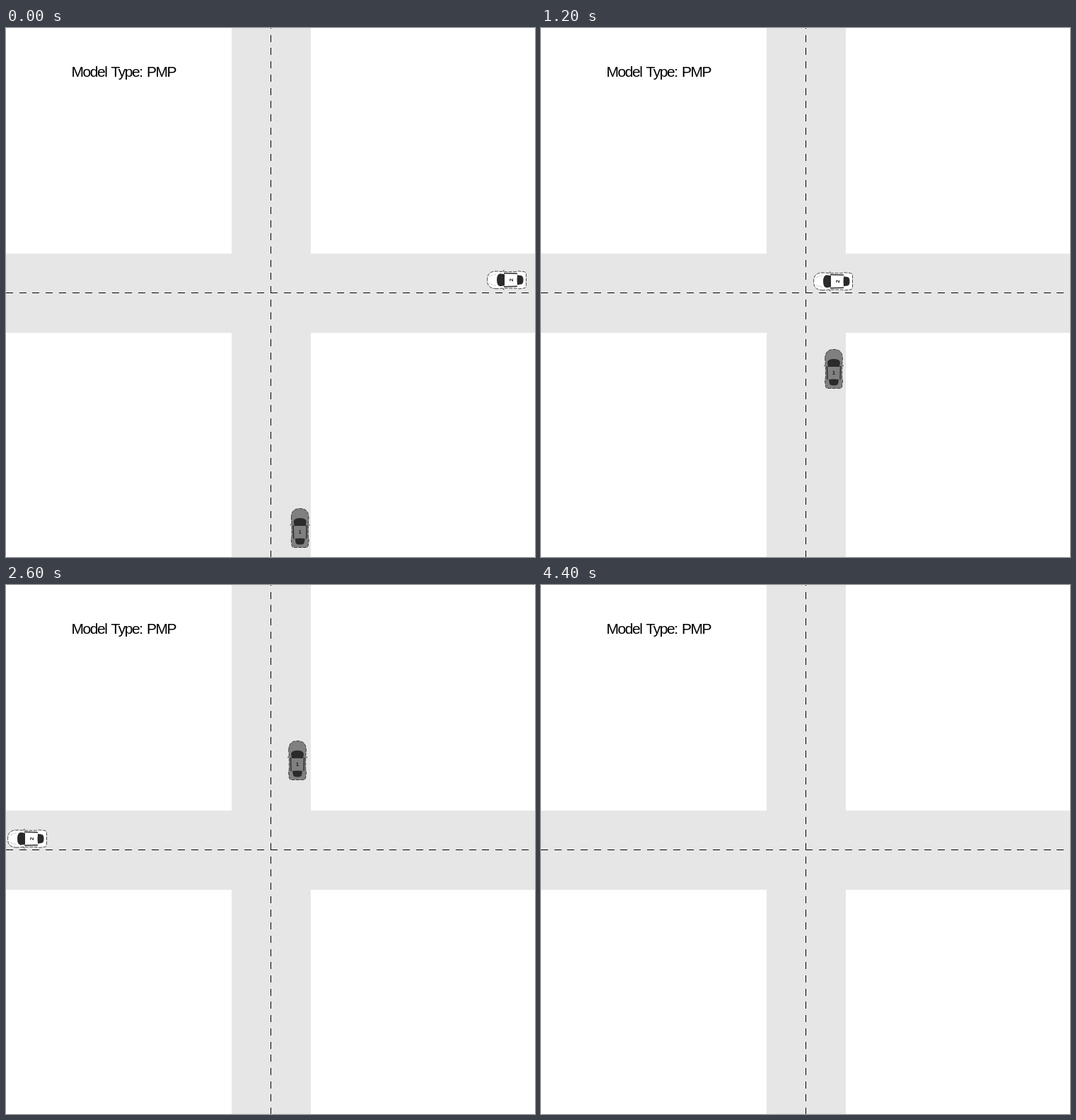
An HTML page that plays this animation: 748x748 px, repeating every 5800 ms.

```html
<!DOCTYPE html>
<html lang="en">
<head>
<meta charset="utf-8">
<title>Crossing</title>
<style>
html, body { margin: 0; width: 100%; height: 100%; overflow: hidden; background: #fff; }
svg { display: block; }
text { font-family: "Liberation Sans", Arial, sans-serif; }
.label { font-size: 21px; letter-spacing: -1.45px; word-spacing: 2px; }
.number { font-size: 8px; font-weight: bold; text-anchor: middle; fill: #222; }
</style>
</head>
<body>
<svg width="748" height="748" viewBox="0 0 748 748">
  <defs>
    <!-- Nose at the origin, pointing up; the body takes the fill of its user -->
    <g id="car">
      <path d="M-12 23L-14 24M12 23L14 24" stroke="#222"/>
      <path d="M-12.300 14C-12.300 4-8 .5 0 .5S12.300 4 12.300 14L11.600 24V40L12.500 45L11.500 53Q11 55.500 8.500 55.500H-8.500Q-11 55.500-11.500 53L-12.500 45L-11.600 40V24Z"
            stroke="#222" stroke-width=".8" stroke-dasharray="5 1.500"/>
      <path d="M-8 12.500Q-7 6-4 3M8 12.500Q7 6 4 3" fill="none" stroke="#777" stroke-width=".5" stroke-dasharray="2 1"/>
      <path d="M-9.500 24L-9 43M9.500 24L9 43" stroke="#2b2b2b" stroke-width="1.400"/>
      <path d="M-9 19Q-8.500 14 0 14T9 19L8 25H-8ZM-7 43Q0 42 7 43L6 49Q5 51.500 0 51.500T-6 49Z" fill="#2b2b2b"/>
    </g>
  </defs>
  <g shape-rendering="crispEdges">
    <path d="M319 0H431V319H748V431H431V748H319V431H0V319H319Z" fill="#e6e6e6"/>
    <path d="M0 374.500H748M374.500 749V0" stroke="#000" stroke-dasharray="10 8.700"/>
  </g>
  <text class="label" x="92.500" y="69">Model Type: PMP</text>
  <g id="car1"><use href="#car" fill="#808080"/><text class="number" y="36">1</text></g>
  <g id="car2"><use href="#car" fill="#fff"/><text class="number" y="36.500">2</text></g>
</svg>
<script>
const LOOP = 5800, STEP = 200;
const car1 = document.getElementById("car1");
const car2 = document.getElementById("car2");

// Steady speed after a damped approach
const northbound = step =>
  653.3 - 33.3 * step + 26 * Math.exp(-step / 3.5) * Math.cos(Math.PI * step / 12);

// Speeds up through the crossing, then eases off
const westbound = step => 680 - 52.15 * step + 0.062 * step * (13 - step) ** 2;

function place(car, x, y, angle) {
  car.setAttribute("transform", `translate(${x} ${y}) rotate(${angle})`);
}

function draw(now) {
  const step = Math.floor(now % LOOP / STEP);
  place(car1, 415.7 - 0.28 * step, Math.round(northbound(step)), 0);
  place(car2, Math.round(westbound(step)), 358.9 - 2.6 * Math.exp(-step / 4), -90);
  requestAnimationFrame(draw);
}
draw(performance.now());
</script>
</body>
</html>
```
